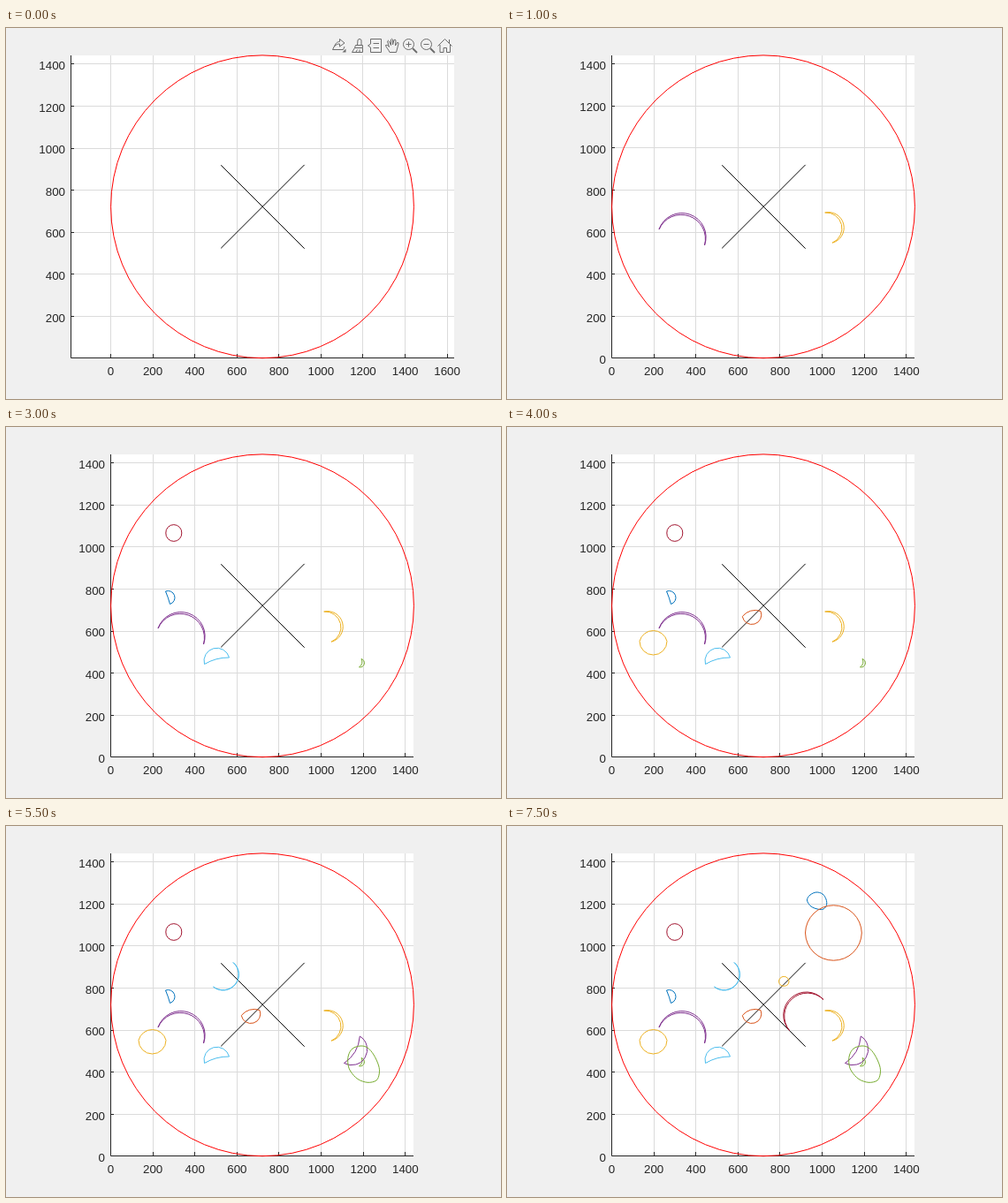
An HTML page for the animation above (8000 ms loop, 560 by 420 pixels).

```html
<!DOCTYPE html>
<html lang="en">
<head>
<meta charset="utf-8">
<title>Shapes in a circle</title>
<style>
  html, body { margin: 0; width: 100%; height: 100%; overflow: hidden; background: #f0f0f0; }
  svg { display: block; width: 560px; height: 420px; }
  text { font: 13.33px "Liberation Sans", Arial, sans-serif; fill: #262626; }
  .grid { stroke: #dbdbdb; }
  .axis { stroke: #262626; fill: none; }
  .line { fill: none; stroke-width: 1; stroke-linejoin: round; }
  .tools { fill: none; stroke: #6c6c6c; stroke-width: 1; stroke-linejoin: round; }
  .tools .solid { fill: #6c6c6c; }
</style>
</head>
<body>
<svg viewBox="0 0 560 420">
  <g id="wide"></g>
  <g id="square"></g>
  <g class="line">
    <circle cx="290" cy="202.3" r="171.4" stroke="#f00"/>
    <path d="M243.2 155.3L337.6 249.7M243.2 249.300L337.6 154.900" stroke="#000"/>
  </g>
  <g id="shapes" class="line"></g>
  <g id="tools" class="tools">
    <!-- export -->
    <path d="M372 19.500L369.500 24.500H381.500L383 21M372 20.500C373 16 376 15.500 377.500 15.500V12.500L383 17L377.500 21V18C375 18 373.500 18.500 372 20.500"/>
    <path class="solid" stroke="none" d="M384.500 23.500V27.500H380.500Z"/>
    <!-- brush -->
    <path d="M397.500 19.500L398 13.500Q400 11 402 13.500V19.500M395.500 19.500H403.500V22.500H394.500ZM394.500 22.500L391.500 27.500H403.500V22.500M396 27L397.500 24.500M400 27V24.500"/>
    <!-- data tip -->
    <path d="M412.500 12.500H424.500V27.500H412.500V22L409.500 20L412.500 18ZM415.500 17.500H422M415.500 22.500H422"/>
    <!-- pan -->
    <path d="M434 27.500C433 24.500 429.500 21.500 429.500 19.500Q431 18 433.500 21.500L431.500 15Q432.500 13.500 433.500 15L435.500 19.500V13Q436.500 11.500 437.500 13V19L439 13.500Q440.500 12.500 441 14L440.500 20L442.500 16.500Q444.500 16 444 18L441.500 27.500Z"/>
    <!-- zoom -->
    <circle cx="455.500" cy="18.500" r="6"/>
    <path d="M452.500 18.500H458.500M455.500 15.500V21.500"/>
    <circle cx="475.500" cy="18.500" r="6"/>
    <path d="M472.500 18.500H478.500"/>
    <path stroke-width="1.8" d="M460 23L465 28M480 23L485 28"/>
    <!-- home -->
    <path d="M488.500 20.500L496.500 12.500L504.500 20.500M491 19V27.500H495V22.500H498.500V27.500H502.500V19M501.500 17V13"/>
  </g>
</svg>
<script>
const LOOP = 8000, STEP = 500;
const [BLUE, ORANGE, YELLOW, PURPLE, GREEN, CYAN, RED] =
  ['#0072bd', '#d95319', '#edb120', '#7e2f8e', '#77ac30', '#4dbeee', '#a2142f'];
const $ = id => document.getElementById(id);
const snap = v => Math.floor(v) + 0.5;

// x0, y0: where zero lies; unit: pixels per 200.
function drawAxes(id, { left, right, x0, y0, unit, columns, firstRow }) {
  const top = 31, bottom = 373;
  let grid = '', axis = `M${left + .5} ${top}V${bottom + .5}H${right}`, labels = '';
  for (let k = 0; k <= columns; k++) {
    const x = x0 + unit * k;
    grid += `M${snap(x)} ${top}V${bottom}`;
    axis += `M${snap(x)} ${bottom}v-4`;
    labels += `<text x="${x}" y="393" text-anchor="middle">${k * 200}</text>`;
  }
  for (let k = firstRow; k <= 7; k++) {
    const y = y0 - unit * k;
    if (k) {
      grid += `M${left} ${snap(y)}H${right}`;
      axis += `M${left} ${snap(y)}h4`;
    }
    labels += `<text x="${left - 6}" y="${Math.round(y + 6.2)}" text-anchor="end">${k * 200}</text>`;
  }
  $(id).innerHTML = `<rect x="${left}" y="${top}" width="${right - left}" height="${bottom - top}" fill="#fff"/>
    <path class="grid" d="${grid}"/><path class="axis" d="${axis}"/>${labels}`;
}

// Two arcs over one chord; each bulge is its height to the left of a→b.
function moon(ax, ay, bx, by, out, back) {
  const half = Math.hypot(bx - ax, by - ay) / 2;
  const arc = (s, sweep, x, y) => {
    const r = (half * half + s * s) / (2 * Math.abs(s));
    return `A${r} ${r} 0 ${+(Math.abs(s) > half)} ${+sweep} ${x} ${y}`;
  };
  return `M${ax} ${ay}` + arc(out, out > 0, bx, by) + arc(back, back < 0, ax, ay);
}

// Smooth closed curve through the points.
function blob(...p) {
  const n = p.length, at = i => p[(i + n) % n];
  let d = `M${p[0]}`;
  for (let i = 0; i < n; i++) {
    const [a, b, c, e] = [at(i - 1), at(i), at(i + 1), at(i + 2)];
    const c1 = b.map((v, j) => v + (c[j] - a[j]) / 6);
    const c2 = c.map((v, j) => v - (e[j] - b[j]) / 6);
    d += `C${c1} ${c2} ${c}`;
  }
  return d + 'Z';
}

// One new shape per step, in order of appearance.
const shapes = [
  [YELLOW, moon(359.7, 209, 368, 243.2, 17.4, 15)],
  [PURPLE, moon(172, 228, 223.5, 246, 27.5, 25.5)],
  [GREEN, moon(402, 262.5, 399.5, 271.8, 4.7, 2)],
  [CYAN, moon(224.5, 268.5, 252.5, 261, 14.5, 2)],
  [RED, moon(180.8, 120, 198.8, 120, 9.4, -9.4)],
  [BLUE, moon(180.5, 186, 185.5, 200.5, 8, 0.3)],
  [ORANGE, moon(266.3, 214.5, 287, 208.5, 3.5, -12)],
  [YELLOW, moon(150, 242.5, 181, 242.5, 12, -15.5)],
  [PURPLE, moon(400.3, 238, 382.5, 268.5, 17.2, 4)],
  [GREEN, blob([387, 270], [387.3, 260], [392, 252], [401, 249], [409, 251], [416, 259],
    [421.5, 271], [422.3, 280], [419, 288], [409, 290.3], [398, 286.5], [390, 278])],
  [CYAN, moon(257, 154.5, 234.5, 182, 17.6, 17.4)],
  [RED, moon(319.5, 231.5, 358, 196.5, 26, 24.5)],
  [BLUE, blob([339.5, 84], [343, 78], [350, 75], [357, 77], [361, 83], [361.5, 89.5],
    [358, 94], [352, 94.2], [344, 91])],
  [ORANGE, moon(337.5, 121, 401.3, 121, 31.2, -31.2)],
  [YELLOW, moon(307.5, 176.2, 319, 176.2, 5.8, -5)]
];

drawAxes('wide', { left: 73, right: 507, x0: 118.42, y0: 374.05, unit: 47.59, columns: 8, firstRow: 1 });
drawAxes('square', { left: 118, right: 461, x0: 118.5, y0: 374, unit: 47.62, columns: 7, firstRow: 0 });
$('shapes').innerHTML = shapes.map(([c, d]) => `<path stroke="${c}" d="${d}"/>`).join('');
const paths = [...$('shapes').children];
const show = (el, on) => { el.style.display = on ? '' : 'none'; };
const start = performance.now();

function render(now) {
  const count = Math.floor((Math.max(0, now - start) % LOOP) / STEP);
  show($('wide'), count === 0);
  show($('square'), count > 0);
  show($('tools'), count < 2);
  $('tools').setAttribute('transform', `translate(${count ? -45 : 0})`);
  paths.forEach((p, i) => show(p, i < count));
  requestAnimationFrame(render);
}
render(start);
</script>
</body>
</html>
```
